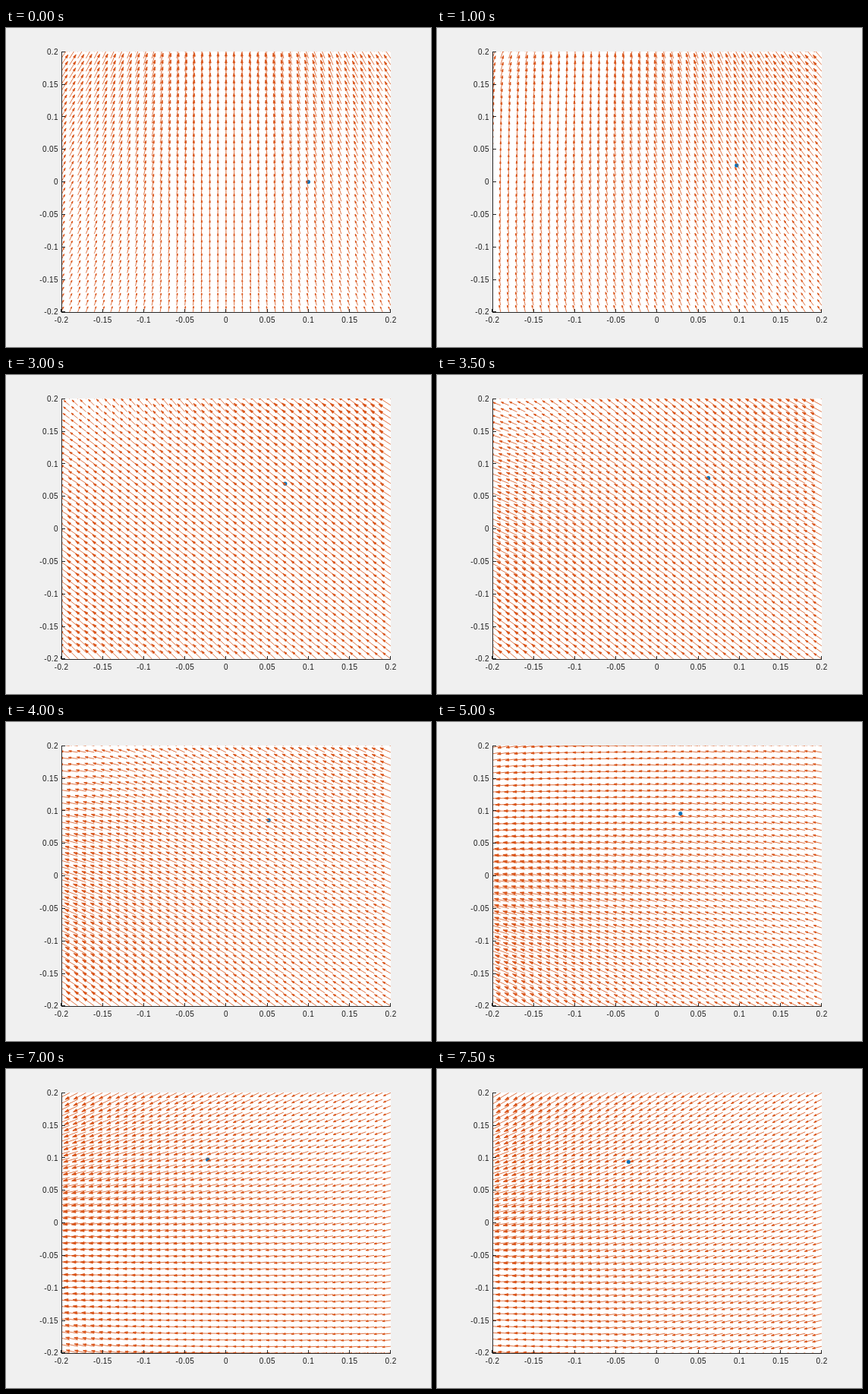
Write an HTML page that moves like this. It is 560x420 px and loops after 8 s.

```html
<!DOCTYPE html>
<html lang="en">
<head>
<meta charset="utf-8">
<title>Rotating vector field</title>
<style>
  html, body { margin: 0; width: 100%; height: 100%; overflow: hidden; background: #f0f0f0; }
  svg { display: block; width: 560px; height: 420px; }
  text { font: 10px "Liberation Sans", Arial, sans-serif; letter-spacing: .4px; fill: #1c1c1c; }
  .axes { stroke: #262626; fill: none; shape-rendering: crispEdges; }
  .field { stroke: #d95319; fill: #d95319; stroke-width: .8; stroke-linejoin: miter; }
</style>
</head>
<body>
<svg viewBox="0 0 560 420">
  <defs><clipPath id="box"><rect x="73" y="31" width="434" height="343"/></clipPath></defs>
  <rect x="73" y="31" width="434" height="343" fill="#fff"/>
  <g clip-path="url(#box)">
    <circle id="dot" r="2.6" fill="#0072bd"/>
    <path id="field" class="field"/>
  </g>
  <path id="axes" class="axes"/>
  <g id="labels"></g>
</svg>
<script>
const STEP_MS = 500, STEPS = 16;
const TURN = 2 * Math.PI / 49;   // angle per step
const HALF = 20, CELL = 0.01;    // grid of 41 x 41 arrows
const POLE_DIST = 1, MAX_LEN = 0.0195, ORBIT = 0.1;
const POLES = [[0, 1], [-1, 0], [0, -1], [1, 0]];
const SX = 1085, SY = 856;       // pixels per unit

const $ = id => document.getElementById(id);
const px = x => 289.9 + SX * x;
const py = y => 202.6 - SY * y;
const num = v => v.toFixed(2);

function label(text, x, y, anchor) {
  const el = document.createElementNS('http://www.w3.org/2000/svg', 'text');
  el.setAttribute('x', x);
  el.setAttribute('y', y);
  el.setAttribute('text-anchor', anchor);
  el.textContent = text;
  $('labels').append(el);
}

function drawAxes() {
  let d = 'M73.5 31V375M73 374.5H507';
  for (let i = -4; i <= 4; i++) {
    const v = i * 0.05, text = String(+v.toFixed(2));
    const x = Math.floor(px(v)) + 0.5, y = Math.floor(py(v)) + 0.5;
    d += `M${x} 374v-4M74 ${y}h4`;
    label(text, px(v) + 0.2, 388, 'middle');
    label(text, 69, py(v) + 3.6, 'end');
  }
  $('axes').setAttribute('d', d);
}

// Planar dipole standing off the plot in direction (ax, ay)
function pole(ax, ay, x, y) {
  const u = POLE_DIST - (x * ax + y * ay);
  const c = y * ax - x * ay;
  const r4 = (u * u + c * c) ** 2;
  const along = (u * u - c * c) / r4, across = -2 * c * u / r4;
  return [along * ax - across * ay, along * ay + across * ax];
}

function fieldAt(angle, x, y) {
  let vx = 0, vy = 0;
  for (const [ax, ay] of POLES) {
    const w = Math.max(0, Math.cos(angle) * ay - Math.sin(angle) * ax);
    if (!w) continue;
    const [fx, fy] = pole(ax, ay, x, y);
    vx += w * fx;
    vy += w * fy;
  }
  return [vx, vy];
}

function arrow(x, y, vx, vy) {
  const x0 = px(x), y0 = py(y), dx = SX * vx, dy = -SY * vy;
  const tx = x0 + dx, ty = y0 + dy;
  const bx = tx - dx * 0.28, by = ty - dy * 0.28;
  const wx = -dy * 0.09, wy = dx * 0.09;
  return `M${num(x0)} ${num(y0)}L${num(tx)} ${num(ty)}` +
    `L${num(bx + wx)} ${num(by + wy)}L${num(bx - wx)} ${num(by - wy)}L${num(tx)} ${num(ty)}`;
}

function fieldPath(angle) {
  const list = [];
  let top = 0;
  for (let i = -HALF; i <= HALF; i++) {
    for (let j = -HALF; j <= HALF; j++) {
      const x = i * CELL, y = j * CELL;
      const [vx, vy] = fieldAt(angle, x, y);
      top = Math.max(top, Math.hypot(vx, vy));
      list.push([x, y, vx, vy]);
    }
  }
  const k = MAX_LEN / top;
  return list.map(([x, y, vx, vy]) => arrow(x, y, vx * k, vy * k)).join('');
}

let shown = -1;
function draw(now) {
  const step = Math.floor(now / STEP_MS) % STEPS;
  if (step !== shown) {
    shown = step;
    const angle = step * TURN;
    $('field').setAttribute('d', fieldPath(angle));
    $('dot').setAttribute('cx', num(px(ORBIT * Math.cos(angle))));
    $('dot').setAttribute('cy', num(py(ORBIT * Math.sin(angle))));
  }
  requestAnimationFrame(draw);
}

drawAxes();
draw(performance.now());
</script>
</body>
</html>
```
